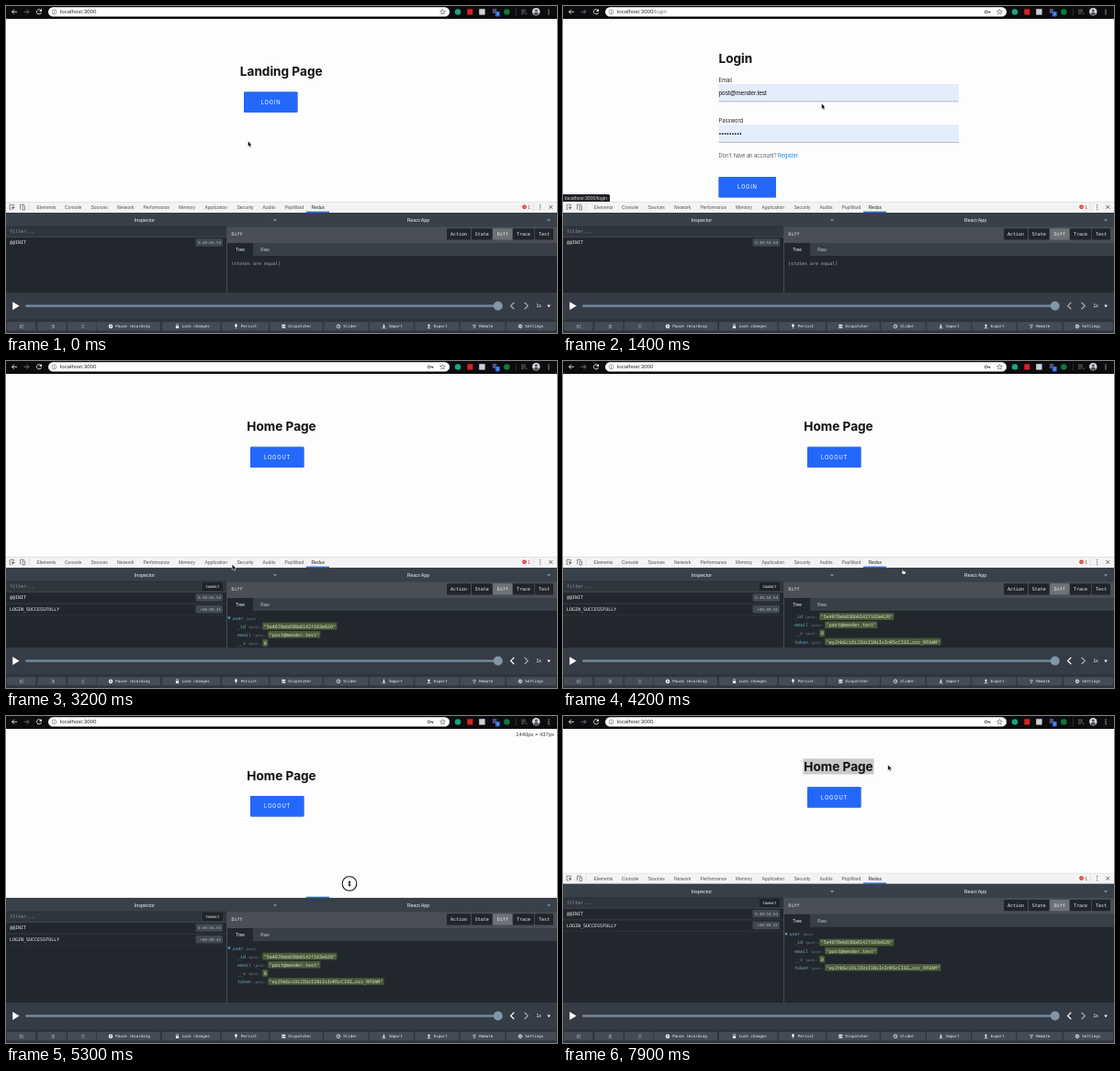
Animation, 600 px wide and 356 px high, one loop 8 s. Source, as an HTML page:

```html
<!DOCTYPE html>
<html lang="en">
<head>
<meta charset="utf-8">
<title>Login flow with state inspector</title>
<style>
html, body { margin: 0; width: 100%; height: 100%; overflow: hidden; background: #fff; }
svg { display: block; width: 600px; height: 356px; }
text { white-space: pre; }
.sans { font-family: "Liberation Sans", Arial, sans-serif; }
.ui { font-family: Inter, "Open Sans", sans-serif; }
.mono { font-family: "DejaVu Sans Mono", "Liberation Mono", monospace; }
.h1 { font-weight: 700; }
.btn { filter: drop-shadow(0 .8px .7px rgba(0, 0, 0, .45)); }
.btn.hot { filter: drop-shadow(0 2px 2.4px rgba(0, 0, 0, .5)); }
</style>
</head>
<body>
<svg id="stage" viewBox="0 0 600 356" xmlns="http://www.w3.org/2000/svg"></svg>
<script>
const LOOP = 8000, STEP = 100;
const BAR_Y = 213, PAGE_Y = 14, SCALE = 600 / 1440;

// Drawing helpers
const text = (x, y, s, size, fill, cls = 'sans', more = '') =>
  `<text x="${x}" y="${y}" font-size="${size}" fill="${fill}" class="${cls}" ${more}>${s}</text>`;
const rect = (x, y, w, h, fill, more = '') =>
  `<rect x="${x}" y="${y}" width="${w}" height="${h}" fill="${fill}" ${more}/>`;
const dot = (x, y, r, fill, more = '') =>
  `<circle cx="${x}" cy="${y}" r="${r}" fill="${fill}" ${more}/>`;
const line = (d, stroke, w = 1, more = '') =>
  `<path d="${d}" fill="none" stroke="${stroke}" stroke-width="${w}" ${more}/>`;
const shape = (d, fill, more = '') => `<path d="${d}" fill="${fill}" ${more}/>`;
const group = (id, body, more = '') => `<g id="${id}" ${more}>${body}</g>`;
const dots3 = (x, y, fill) => [-2.3, 0, 2.3].map(d => dot(x, y + d, .65, fill)).join('');
const MID = 'text-anchor="middle"', END = 'text-anchor="end"';

function button(id, x, y, w, label, tx) {
  return group(id, rect(x, y, w, 22.5, '#2468fb', 'rx="1"'), 'class="btn"') +
    text(tx, y + 13.4, label, 5.83, '#fff', 'ui', 'letter-spacing=".75"');
}

function toolbar() {
  const star = Array.from({ length: 10 }, (_, i) => {
    const a = i * Math.PI / 5 - Math.PI / 2, r = i % 2 ? 1.3 : 3;
    return (475.5 + r * Math.cos(a)).toFixed(2) + ' ' + (6.5 + r * Math.sin(a)).toFixed(2);
  }).join('L');
  return rect(0, 0, 600, 14, '#0c0c0e') +
    line('M12 6.3H6.5M9 3.8L6.5 6.3L9 8.8', '#e8e8e8', .9) +
    line('M19.5 6.3H25M22.5 3.8L25 6.3L22.5 8.8', '#77787c', .9) +
    line('M38 4.6A2.6 2.6 0 1 0 38.5 7', '#e8e8e8', .9) + shape('M39 3V6H36Z', '#e8e8e8') +
    rect(46, 1.2, 437, 10.4, '#fff', 'rx="5.2"') +
    dot(52.5, 6.4, 2.4, 'none', 'stroke="#5f6368" stroke-width=".6"') +
    rect(52.2, 6, .6, 1.9, '#5f6368') + rect(52.2, 4.8, .6, .6, '#5f6368') +
    '<text x="59" y="8.4" font-size="6.1" fill="#26282b" class="sans">localhost:3000<tspan id="path" fill="#75787c">/login</tspan></text>' +
    group('key', dot(460.6, 6.4, 1.4, 'none', 'stroke="#444" stroke-width=".9"') +
      line('M462 6.4H465.4M464.6 6.4V8', '#444', .9)) +
    line('M' + star + 'Z', '#55585c', .6) +
    dot(492, 6.4, 3.2, '#16a683') + rect(502.3, 3.3, 6, 6.2, '#d8241f') +
    rect(515.2, 3.2, 6.4, 6.4, '#cfd1d4') + rect(529.8, 3, 4.4, 5, '#5b4a78') +
    rect(532.8, 6, 5, 5.4, '#2468d8', 'rx=".8"') + text(535.3, 10.3, '1', 4, '#fff', 'sans', MID) +
    dot(545.3, 6.4, 3.2, '#0f7a3a') + rect(555, 2.5, .5, 8, '#4a4b4f') +
    line('M561 4.3H566M561 6.3H566M561 8.3H564M565.3 8.3H567.5', '#909196', .7) +
    dot(577.3, 6.3, 4.2, '#d5d7dc') + dot(577.3, 5, 1.5, '#54565d') +
    shape('M574.3 9.2Q574.6 6.8 577.3 6.8T580.3 9.2Q577.3 11.4 574.3 9.2', '#54565d') +
    dots3(591, 6.4, '#e8e8e8');
}

function page() {
  const field = (y, label) => text(169.5, y - 2.4, label, 5.75, '#222', 'ui') +
    rect(169.5, y, 261.5, 19, '#e3edfc') + rect(169.5, y + 18.7, 261.5, .6, '#8d949e');
  let bullets = '';
  for (let i = 0; i < 9; i++) bullets += dot(171 + i * 2.8, 139.2, .85, '#111');
  const landing = text(299.7, 76, 'Landing Page', 13.6, '#111', 'ui h1', MID) +
    button('enter', 259, 93.5, 58.5, 'LOGIN', 277.7);
  const login = text(169.5, 61.7, 'Login', 13.6, '#111', 'ui h1') +
    field(85, 'Email') + text(169.5, 97.2, 'post@mender.test', 6.45, '#111') +
    field(129.3, 'Password') + bullets +
    text(169.5, 165, 'Don\'t have an account?', 5.68, '#555', 'ui') +
    text(234, 165, 'Register', 5.7, '#1584e0', 'ui') +
    button('submit', 169.5, 186, 62.5, 'LOGIN', 190);
  const home = rect(261.5, 62.7, 0, 17, '#c9c9c9', 'id="pick"') +
    text(300, 76, 'Home Page', 13.6, '#111', 'ui h1', MID) +
    button('leave', 266, 93.5, 58.5, 'LOGOUT', 281);
  return rect(0, PAGE_Y, 600, 200, '#fdfdfd') +
    group('landing', landing) + group('login', login) + group('home', home) +
    group('status', rect(-2, 205, 53, 9, '#202124', 'rx="1.5"') +
      text(2, 210.9, 'localhost:3000/login', 5.2, '#d4d6d9')) +
    text(597, 21.8, '', 5.85, '#333', 'sans', END + ' id="size"');
}

function tabBar() {
  const tabs = { Elements: 33.5, Console: 64, Sources: 92.5, Network: 121, Performance: 149.5,
    Memory: 188, Application: 216.5, Security: 251.5, Audits: 279.5, PopWard: 303.5, Redux: 332.5 };
  const labels = Object.entries(tabs).map(([s, x]) =>
    text(x, 220.8, s, 5, s === 'Redux' ? '#222' : '#505357')).join('');
  return rect(0, 213, 600, 12, '#f3f3f3') + rect(0, 212.8, 600, .6, '#c8c8c8') +
    line('M8.6 218V216.3H4.2V221.3H6', '#5a5d61', .7) + shape('M6 218L10 219.6L8.3 220.2L7.6 222Z', '#5a5d61') +
    line('M15.5 221.5V216.3H20M18 218H20.6V222H18Z', '#5a5d61', .7) + rect(24.8, 215, .5, 8, '#ccc') +
    labels + rect(327, 223.6, 25, 1.4, '#2a72e5') +
    dot(564.5, 218.8, 2.3, '#d93025') + line('M563.6 217.9L565.4 219.7M565.4 217.9L563.6 219.7', '#fff', .5) +
    text(568.3, 220.8, '1', 5, '#c33') + rect(574.3, 215, .5, 8, '#ccc') +
    dots3(581.7, 219, '#5a5d61') + line('M591.4 217L595.2 220.8M595.2 217L591.4 220.8', '#444', .8);
}

function tree() {
  const row = (i, key, val) => {
    const y = 281.5 + i * 9.13, x = 252, kx = x + key.length * 3.01 + 2.8, vx = kx + 17;
    return text(x, y, key, 5, '#6aa5c2', 'mono') + text(kx, y, '(pin):', 3.75, '#7d858d', 'mono') +
      rect(vx - 1.7, y - 5.8, val.length * 3.01 + 3, 7.6, '#4a5c39', 'rx="1"') +
      text(vx, y, val, 5, '#dbe3cf', 'mono');
  };
  return shape('M241.3 278.4H244.7L243 281.4Z', '#6aa5c2') +
    text(246.5, 281.5, 'user', 5, '#6aa5c2', 'mono') + text(261, 281.5, '(pin)', 3.75, '#7d858d', 'mono') +
    row(1, '_id', '"5e4070eb036b0142f103e620"') + row(2, 'email', '"post@mender.test"') +
    row(3, '__v', '0') + row(4, 'token', '"eyJhbGciOiJIUzI1NiIsInR5cCI6I…nzc_RFOAM"');
}

function inspector() {
  const stamp = (y, s) => rect(206.5, y - 6, 29.5, 8.4, '#414850', 'rx="1"') +
    text(234, y - .3, s, 4.17, '#aeb6be', 'mono', END);
  const modes = [['Action', 480, 26], ['State', 507, 22.5], ['Diff', 530.2, 21], ['Trace', 552, 23], ['Test', 575.8, 20.2]];
  const buttons = modes.map(([s, x, w]) =>
    rect(x, 242.3, w, 12.2, s === 'Diff' ? '#6d7277' : '#20252b', 'rx="1"') +
    text(x + w / 2, 250.2, s, 5, '#f0f2f4', 'mono', MID)).join('');
  const caret = x => shape(`M${x - 2} 232.2H${x + 2}L${x} 234.6Z`, '#8b939b');
  return rect(0, 225, 600, 140, '#22272d') +
    group('equal', text(245, 282, '(states are equal)', 5, '#a2a9b0', 'mono')) +
    group('tree', tree()) +
    rect(241, 258, 359, 14, '#393f47') + rect(241, 258, 28, 14.2, '#22272d') +
    text(255, 267, 'Tree', 4.8, '#f0f2f4', 'sans', MID) + text(282, 267, 'Raw', 4.8, '#c4c9ce', 'sans', MID) +
    rect(0, 225, 600, 15.3, '#38404a') +
    text(151, 235, 'Inspector', 5.45, '#f2f4f6', 'sans', MID) + caret(293) +
    text(449, 235, 'React App', 5.35, '#f2f4f6', 'sans', MID) + caret(591) +
    rect(0, 240, 240, 11.2, '#30363d') + rect(0, 239.8, 240, .6, '#22272d') +
    text(4, 247.3, 'filter...', 5, '#949ba3', 'mono') + rect(0, 251, 240, .7, '#4b525b') +
    text(4, 259.3, '@@INIT', 5, '#eef0f2', 'mono') + stamp(259.3, '5:48:54.54') +
    group('logged', rect(214, 241.2, 22, 8.8, '#1d2227', 'rx="1"') +
      text(225, 247.1, 'Commit', 4.17, '#fff', 'mono', MID) +
      rect(0, 263.8, 240, .6, '#434a52') + text(4, 272, 'LOGIN_SUCCESSFULLY', 5, '#eef0f2', 'mono') +
      stamp(272, '+00:09.41') + rect(0, 276.6, 240, .5, '#343a41')) +
    rect(241, 240.3, 359, 17.7, '#4a4f55') + text(245.5, 250.2, 'Diff', 5, '#e8eaec', 'mono') + buttons +
    rect(240, 240, 1, 120, '#454c55');
}

function player() {
  const icon = {
    Pause: x => dot(x, 348.7, 2.2, '#fff') + rect(x - .9, 347.7, .6, 2, '#444b55') + rect(x + .3, 347.7, .6, 2, '#444b55'),
    Lock: x => rect(x - 1.6, 348.4, 3.2, 2.4, '#fff') + line(`M${x - 1} 348.4V347.3A1 1 0 0 1 ${x + 1} 347.3V348.4`, '#fff', .6),
    Persist: x => shape(`M${x - 1} 346.3H${x + 1}V348L${x + 1.7} 349H${x - 1.7}L${x - 1} 348Z`, '#fff') + rect(x - .3, 349, .6, 2.2, '#fff'),
    Dispatcher: x => rect(x - 2, 346.8, 4, 1.6, '#fff') + rect(x - 2, 349, 4, 1.8, '#ccd1d6'),
    Slider: x => dot(x, 348.7, 1.9, 'none', 'stroke="#fff" stroke-width=".7"') + line(`M${x} 347.4V348.8H${x + 1}`, '#fff', .5),
    Import: x => shape(`M${x - 1.6} 348.5H${x + 1.6}L${x} 350.3Z`, '#fff') + rect(x - .4, 346.4, .8, 2.3, '#fff') + rect(x - 2, 350.5, 4, .6, '#fff'),
    Export: x => shape(`M${x - 1.6} 348.2H${x + 1.6}L${x} 346.3Z`, '#fff') + rect(x - .4, 348, .8, 2.2, '#fff') + rect(x - 2, 350.5, 4, .6, '#fff'),
    Remote: x => line(`M${x - 2} 348A3 3 0 0 1 ${x + 2} 348M${x - 1.1} 349.4A1.7 1.7 0 0 1 ${x + 1.1} 349.4`, '#fff', .6) + dot(x, 350.5, .5, '#fff'),
    Settings: x => dot(x, 348.7, 1.4, 'none', 'stroke="#fff" stroke-width="1"') + dot(x, 348.7, 2.1, 'none', 'stroke="#fff" stroke-width=".6" stroke-dasharray=".8 .85"')
  };
  const items = [['Pause recording', 99, 69, 114], ['Lock changes', 170, 63.5, 186.5], ['Persist', 235, 51, 250.5],
    ['Dispatcher', 287.3, 57.5, 302.3], ['Slider', 346.2, 48.5, 362], ['Import', 396, 48, 411.5],
    ['Export', 445.2, 48, 460.5], ['Remote', 494.5, 49, 510], ['Settings', 545, 54, 560]];
  const cell = (x, w) => rect(x, 344, w, 9.2, '#444b55', 'rx=".8"');
  const blanks = [1, 34.3, 67].map((x, i) => cell(x, 31.3) +
    line(`M${x + 15} 347.2H${x + 18.5}M${x + 15} 348.8H${x + 18.5}M${x + 15} 350.4H${x + 18.5}`, '#949ba3', .6) +
    (i < 2 ? rect(i ? x + 17 : x + 14.2, 347, 1, 3.7, '#949ba3') : '')).join('');
  return rect(0, 312, 600, 29, '#353c46') + rect(0, 341, 600, 15, '#2f353e') +
    shape('M7.2 322V331L14.6 326.5Z', '#fff') +
    rect(21, 325.2, 517, 2.6, '#7488 9b'.replace(' ', ''), 'rx="1.3"') + dot(535.8, 326.5, 5, '#8296a9') +
    line('M553.3 322.8L549.6 326.4L553.3 330', '#a5adb6', 1.2, 'id="prev"') +
    line('M564.6 322.8L568.3 326.4L564.6 330', '#a5adb6', 1.2) +
    text(577.5, 328.2, '1x', 5, '#fff') + shape('M589.3 325.4H592.9L591.1 328.2Z', '#fff') +
    blanks + items.map(([s, x, w, ix]) => cell(x, w) + icon[s.split(' ')[0]](ix) +
      text(ix + 5.3, 350.2, s, 4.17, '#f2f4f6', 'mono')).join('');
}

function pointers() {
  const edge = 'stroke="#fff" stroke-width=".5"';
  const arrows = 'M0 -3.2L1.7 -1H.5V1H1.7L0 3.2L-1.7 1H-.5V-1H-1.7Z';
  return group('arrow', shape('M0 0V6.2L1.4 5L2.4 7.2L3.5 6.7L2.5 4.6H4.4Z', '#000', edge)) +
    group('hand', shape('M-.9 -.3Q-.2 -1 .4 -.2V2.2L3.2 2.8Q3.8 3.2 3.6 4.2L3 6.4H-.1L-2.2 3.8Q-2 2.9 -.9 3.5Z', '#fff', 'stroke="#000" stroke-width=".7"')) +
    group('beam', line('M-1 -3.2H1M0 -3.2V3.2M-1 3.2H1', '#111', .7)) +
    group('resize', dot(0, 0, 7.8, '#fff', 'id="ring" stroke="#111" stroke-width="1.1"') + shape(arrows, '#000'));
}

document.getElementById('stage').innerHTML =
  '<defs><clipPath id="view"><rect id="viewBox" x="0" y="14" width="600" height="199"/></clipPath></defs>' +
  group('tools', tabBar() + inspector()) + player() +
  group('page', page(), 'clip-path="url(#view)"') + toolbar() + group('cursor', pointers());

// Motion tables: time, then values
const CURSOR = [
  [0, 263.5, 147], [STEP, 268, 140], [300, 283, 104], [1200, 283, 104], [1400, 281.5, 106],
  [2000, 195, 200], [3000, 195, 200], [3800, 400, 285], [4000, 398, 282], [4200, 370, 226],
  [4500, 372, 213], [4600, 372, 213], [5300, 374, 182.5], [5500, 371, 176], [5600, 369, 178],
  [5800, 369, 178], [6100, 317.8, 152.5], [6300, 317.8, 152.5], [6900, 261, 55], [7100, 261, 55], [7900, 353.8, 53]];
const TOOLS = [[4600, 0], [4900, 7], [5300, 27], [5500, 42.2]];
const VIEW = [[4700, 213], [5000, 207], [5300, 196.2], [5600, 170.8]];
const SCROLL = [[3800, 0], [4100, 10.5]];
const KIND = [[0, 'arrow'], [300, 'hand'], [800, 'arrow'], [2000, 'hand'], [2700, 'arrow'],
  [4200, 'hand'], [4400, 'resize'], [5900, 'arrow'], [6800, 'beam'], [7800, 'arrow']];

function at(keys, t) {
  let i = keys.findIndex(k => k[0] > t);
  if (i < 0) return keys[keys.length - 1].slice(1);
  if (i === 0) return keys[0].slice(1);
  const a = keys[i - 1], b = keys[i], p = (t - a[0]) / (b[0] - a[0]);
  return a.slice(1).map((v, j) => v + (b[j + 1] - v) * p);
}

const $ = id => document.getElementById(id);
const show = (id, on) => $(id).style.display = on ? '' : 'none';
const move = (id, x, y) => $(id).setAttribute('transform', `translate(${x} ${y})`);

function render(t) {
  const isLogin = t >= 800 && t < 2700, isHome = t >= 2700;
  const [x, y] = at(CURSOR, t), [lift] = at(TOOLS, t), [bottom] = at(VIEW, t);
  const shift = -(BAR_Y - bottom) * .385;

  show('landing', t < 800); show('login', isLogin); show('home', isHome);
  show('path', isLogin); show('key', t >= 800);
  show('status', t >= 500 && t < 1600);
  show('logged', isHome); show('tree', isHome); show('equal', !isHome);
  $('prev').setAttribute('stroke', isHome ? '#fff' : '#a5adb6');
  $('enter').classList.toggle('hot', t >= 300);
  $('submit').classList.toggle('hot', t >= 2000);

  move('tools', 0, -lift);
  move('tree', 0, -Math.max(0, at(SCROLL, t)[0] - lift));
  move('home', 0, shift);
  $('viewBox').setAttribute('height', bottom - PAGE_Y);
  $('size').textContent = t >= 4700 && t < 6600
    ? `1440px × ${Math.floor((bottom - PAGE_Y) / SCALE)}px` : '';
  $('pick').setAttribute('width', t >= 7200 ? Math.min(77, Math.max(0, x - 261.5)) : 0);

  const kind = KIND.filter(k => k[0] <= t).pop()[1];
  for (const k of ['arrow', 'hand', 'beam', 'resize']) show(k, k === kind);
  show('ring', t >= 4600);
  move('cursor', x, y);
}

const start = performance.now();
function tick() {
  const t = (performance.now() - start) % LOOP;
  render(Math.floor(t / STEP) * STEP);
  requestAnimationFrame(tick);
}
tick();
</script>
</body>
</html>
```
